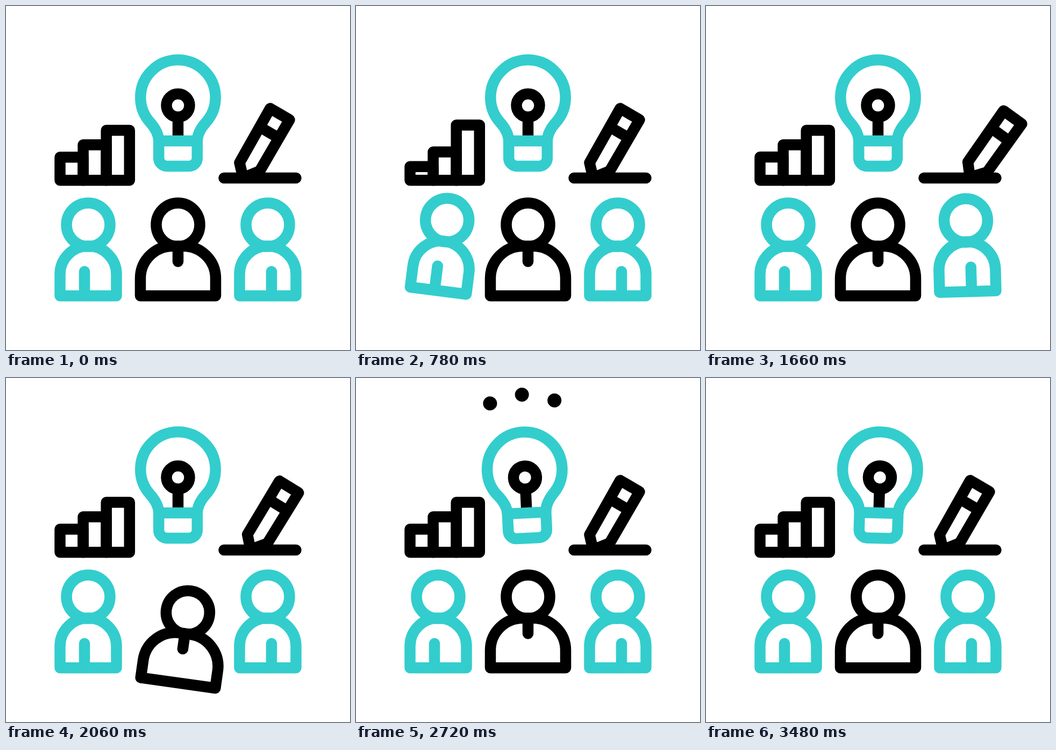
These frames come from a looping animation (640x640 px, 3500 ms). An HTML page:

```html
<!DOCTYPE html>
<html lang="en">
<head>
<meta charset="utf-8">
<title>Team ideas</title>
<style>
  html, body { margin: 0; width: 100%; height: 100%; overflow: hidden; background: #fff; }
  svg { display: block; width: 100%; height: 100%; }
  .ink, .teal { fill: none; stroke-width: 20.5; stroke-linejoin: round; }
  .ink { stroke: #000; }
  .teal { stroke: #33cdcd; }
  .round { stroke-linecap: round; }
</style>
</head>
<body>
<svg viewBox="0 0 640 640">
  <g class="ink">
    <path id="bar1"/><path id="bar2"/><path id="bar3"/>
  </g>

  <path class="ink round" d="M405.5 320H539.5"/>
  <g id="pencil" class="ink">
    <path d="M491.5 190.5L527.5 211.5L472 307L441 319.5L434.5 291.5Z"/>
    <path d="M472 225L508 246"/>
  </g>

  <g id="bulb">
    <g id="dots">
      <circle/><circle/><circle/>
    </g>
    <g class="ink">
      <circle cx="320" cy="185" r="21.5"/>
      <path d="M320 206V243"/>
    </g>
    <path class="teal" d="M284.2 251C284 238 277 226.5 268 216.4A69.7 69.7 0 1 1 372 216.4C363 226.5 356 238 355.8 251"/>
    <path class="teal" d="M284.2 251H355.8V283a15 15 0 0 1 -15 15H299.2a15 15 0 0 1 -15 -15Z"/>
  </g>

  <g id="left" class="teal round">
    <circle cx="153" cy="407" r="40.5"/>
    <path d="M100.5 539.3V499a52.5 52.5 0 0 1 105 0V539.3Z"/>
    <path d="M146 494V539"/>
  </g>
  <g id="right" class="teal round">
    <circle cx="487" cy="407" r="40.5"/>
    <path d="M434.5 539.3V499a52.5 52.5 0 0 1 105 0V539.3Z"/>
    <path d="M494 494V539"/>
  </g>
  <g id="lead" class="ink round">
    <circle cx="320" cy="407" r="40.5"/>
    <path d="M250 539.3V506.7a60 60 0 0 1 60 -60h20a60 60 0 0 1 60 60V539.3Z"/>
    <path d="M320 447V475.5"/>
  </g>
</svg>
<script>
const LOOP = 3500;
const $ = id => document.getElementById(id);
const clamp = f => Math.min(1, Math.max(0, f));
// Eased 0 to 1 between times a and b
const ramp = (t, a, b) => (1 - Math.cos(Math.PI * clamp((t - a) / (b - a)))) / 2;

// Goes to `first` at time a, to `second` at b, and back to 0 at c
function wave(t, first, second, a, b, c) {
  return first * ramp(t, 0, a) + (second - first) * ramp(t, a, b) - second * ramp(t, b, c);
}

const people = [
  { el: $('left'), x: 153, start: 0, side: -1, lift: 12, back: 7.5, settle: 1360 },
  { el: $('right'), x: 487, start: 800, side: 1, lift: 21, back: 4, settle: 980 },
  { el: $('lead'), x: 320, start: 1655, side: 1, lift: 21, back: 4, settle: 980 }
];

const bars = [
  { el: $('bar1'), top: 281.3, start: 500, step: 400, drop: 22 },
  { el: $('bar2'), top: 258.3, start: 400, step: 300, drop: 18 },
  { el: $('bar3'), top: 231.3, start: 200, step: 300, drop: 18 }
];
const BAR_W = 43.1;

const dots = [...$('dots').children];

// Bulb swings with a slowly fading amplitude
function swing(t) {
  if (t < 2225) return 0;
  return 7 * Math.exp((2440 - t) / 2800) * Math.sin(2 * Math.PI * (t - 2225) / 870);
}

function draw(t) {
  for (const p of people) {
    const u = t - p.start;
    const y = wave(u, 28, -p.lift, 400, 700, 980);
    const turn = p.side * wave(u, 8, -p.back, 400, 700, p.settle);
    p.el.setAttribute('transform', `translate(0 ${y}) rotate(${turn} ${p.x} 539.3)`);
  }

  bars.forEach((b, i) => {
    const dy = wave(t - b.start, b.drop, -10, b.step, 2 * b.step, 3 * b.step);
    b.el.setAttribute('d', `M${100.5 + i * BAR_W} 324.2V${b.top + dy}h${BAR_W}V324.2Z`);
  });

  const s = Math.sin(Math.PI * clamp((t - 1040) / 1240)) ** 2;
  $('pencil').setAttribute('transform', `translate(${50 * s} ${-s}) rotate(${5.5 * s} 441 319.5)`);

  $('bulb').setAttribute('transform', `rotate(${swing(t)} 320 303)`);
  const dist = 70 + 71 * Math.sin(clamp((t - 2240) / 560) * Math.PI / 2);
  const r = 13 * (ramp(t, 2240, 2400) - ramp(t, 2800, 2980));
  dots.forEach((dot, i) => {
    const a = (i - 1) * 25.5 * Math.PI / 180;
    dot.setAttribute('cx', 321.5 + dist * Math.sin(a));
    dot.setAttribute('cy', 170 - dist * Math.cos(a));
    dot.setAttribute('r', r);
  });
}

const start = performance.now();
function tick() {
  draw((performance.now() - start) % LOOP);
  requestAnimationFrame(tick);
}
draw(0);
requestAnimationFrame(tick);
</script>
</body>
</html>
```
